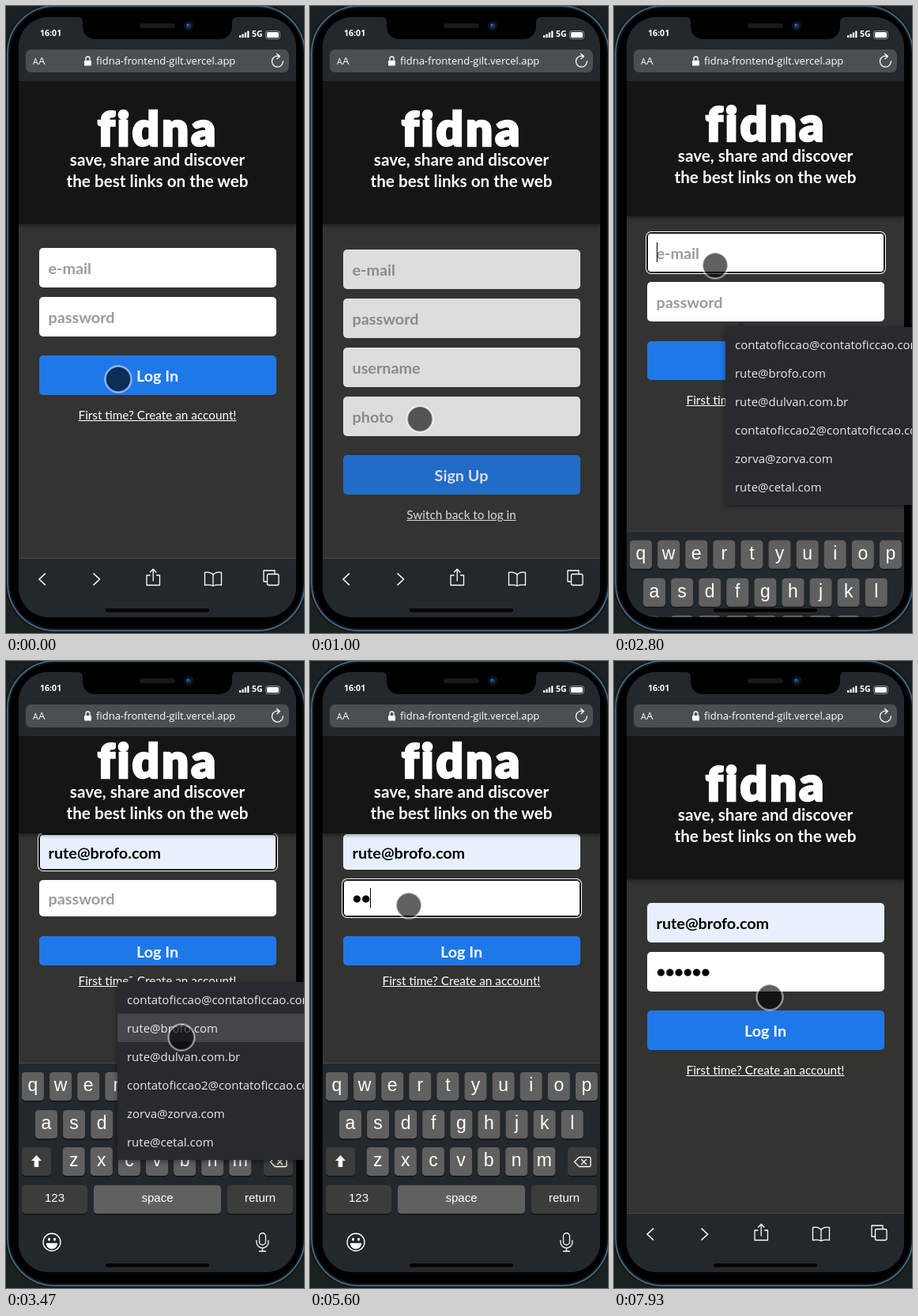
An HTML page for the animation above (8 s loop, 377 by 793 pixels).

```html
<!DOCTYPE html>
<html lang="en">
<head>
<meta charset="utf-8">
<title>Login demo</title>
<style>
  html, body { margin: 0; width: 100%; height: 100%; overflow: hidden; background: #1b2021; }
  #stage { position: relative; width: 377px; height: 793px; overflow: hidden; font-family: Lato, sans-serif; }
  #stage div, #stage svg { position: absolute; box-sizing: border-box; }
  svg { left: 0; top: 0; width: 377px; height: 793px; overflow: visible; }
  .layer { inset: 0; }

  #phone { left: 1px; top: -1px; width: 378px; height: 792px; border-radius: 61px; background: #000;
    border: 2px solid #41647b; box-shadow: 0 0 0 2px #10171b, inset 0 0 0 2px #0c1216; }
  #screen { inset: 0; background: #333331; clip-path: inset(14px 10px 20px 16px round 38px); }

  /* page */
  #head { left: 16px; top: 95px; width: 351px; height: 181px; background: #151513;
    box-shadow: 0 3px 4px rgba(0,0,0,.3); animation: head 8s linear infinite; }
  #brand { animation: brand 8s linear infinite; }
  #brand text { fill: #fff; text-anchor: middle; font: 700 20.7px Lato, sans-serif; }
  #brand .name { font: 900 60px Lato, sans-serif; letter-spacing: 3px; stroke: #fff; stroke-width: 2.5px; }
  .field, .btn { left: 41.5px; width: 300px; height: 50px; border-radius: 5px; display: flex; align-items: center;
    font-weight: 700; font-size: 19.8px; white-space: nowrap; }
  .field { background: #fff; color: #000; padding-left: 12px; }
  .field > div { left: 12px; }
  .hint { color: #9c9c9a; }
  .btn { background: #1f78e8; color: #fff; justify-content: center; }
  .link { left: 42px; width: 299px; height: 20px; line-height: 20px; text-align: center; color: #fff;
    font-size: 15.3px; text-decoration: underline; }
  #login { animation: login 8s linear infinite; }
  #signup { animation: signup 8s linear infinite; }
  #email { animation: email 8s linear infinite, emailRing 8s step-end infinite, filled 8s step-end infinite; }
  #pass { animation: pass 8s linear infinite, passRing 8s step-end infinite; }
  #go { animation: go 8s linear infinite; }
  #join { animation: join 8s linear infinite; }
  #login .caret { position: static; width: 1px; height: 25px; background: #000; }
  #email .caret { animation: emailCaret 8s step-end infinite; }
  #pass .caret { animation: passCaret 8s step-end infinite; }
  #pass #dots { position: static; height: 14px; animation: type 8s step-end infinite;
    background: radial-gradient(circle at 5.4px 8px, #000 4.2px, transparent 4.9px) 0 0 / 11.3px 14px repeat-x; }
  #emailHint { animation: emailHint 8s step-end infinite; }
  #passHint { animation: passHint 8s step-end infinite; }
  .preview { animation: preview 8s step-end infinite; }
  .value { animation: value 8s step-end infinite; }

  /* browser and keyboard */
  #top { left: 16px; top: 14px; width: 351px; height: 81px; background: #23282d; }
  #bar { left: 16px; top: 698px; width: 351px; height: 80px; background: #23282d; border-top: 1px solid #454a4b; }
  #url { left: 25px; top: 55px; width: 333px; height: 29px; border-radius: 7px; background: #4a4f51; }
  .line { fill: none; stroke: #fff; stroke-width: 1.3; stroke-linecap: round; stroke-linejoin: round; }
  .ui { fill: #fff; font-family: "Open Sans", sans-serif; }
  #keys { animation: keys 8s linear infinite; }
  #keys text { fill: #fff; text-anchor: middle; font-family: "Liberation Sans", Arial, sans-serif; }

  /* suggestions and pointer */
  #list { left: 141px; top: 406px; width: 300px; height: 225px; background: #292a2d; border-radius: 3px;
    box-shadow: 0 2px 6px rgba(0,0,0,.45); animation: list 8s step-end infinite; }
  #list::before { content: ""; position: absolute; left: 12px; top: -7px;
    border: 8px solid transparent; border-top: 0; border-bottom: 7px solid #292a2d; }
  #list .item { left: 12px; height: 36px; line-height: 36px; color: #e9eaed; white-space: nowrap;
    font-size: 15px; font-family: "Open Sans", sans-serif; }
  #hover { left: 0; top: 40px; width: 300px; height: 36px; background: #44464a; animation: hover 8s step-end infinite; }
  #dot { left: -17.5px; top: -17.5px; width: 35px; height: 35px; border-radius: 50%;
    background: rgba(0,0,0,.62); background-clip: padding-box; border: 2px solid rgba(255,255,255,.6);
    animation: move 8s linear infinite; }

  @keyframes login { 0%, 7.37% { opacity: 1 } 7.38%, 28.25% { opacity: 0 } 33.7%, 100% { opacity: 1 } }
  @keyframes signup { 0%, 7.38% { opacity: 0 } 13.5%, 28.25% { opacity: 1 } 28.26%, 100% { opacity: 0 } }

  @keyframes head { 0%, 34.12%, 93.3%, 100% { height: 181px } 35% { height: 171px } 36.6%, 90.9% { height: 123px } }
  @keyframes brand { 0%, 34.12%, 93.3%, 100% { transform: none } 35% { transform: translateY(-5px) }
    36.6%, 90.9% { transform: translateY(-29px) } }
  @keyframes email { 0%, 34.12%, 93.3%, 100% { top: 305.5px; height: 50px } 35% { top: 287.5px; height: 50px }
    36.6%, 90.9% { top: 219px; height: 45px } }
  @keyframes pass { 0%, 34.12%, 93.3%, 100% { top: 367.5px; height: 50px } 35% { top: 349.5px; height: 50px }
    36.6%, 90.9% { top: 277px; height: 45.5px } }
  @keyframes go { 0%, 34.12%, 93.3%, 100% { top: 442.3px; height: 50px } 35% { top: 424.2px; height: 50px }
    36.6%, 90.9% { top: 348px; height: 37px } }
  @keyframes join { 0%, 34.12%, 93.3%, 100% { top: 507px } 35% { top: 489px } 36.6%, 90.9% { top: 393.5px } }
  @keyframes keys { 0%, 34.1%, 93.31%, 100% { transform: translateY(300px) } 34.12%, 93.3% { transform: translateY(190px) }
    35% { transform: translateY(157px) } 36.6%, 90.9% { transform: none } }

  @keyframes emailRing { 0%, 54.9% { box-shadow: none }
    34.1% { box-shadow: inset 0 0 0 1px #101010, 0 0 0 1px #101010, 0 0 0 2px #fff } }
  @keyframes passRing { 0%, 90.8% { box-shadow: none }
    54.9% { box-shadow: inset 0 0 0 1px #101010, 0 0 0 1px #101010, 0 0 0 2px #fff } }
  @keyframes filled { 0% { background: #fff } 39.9%, 100% { background: #e7f0fc } }
  @keyframes emailCaret { 0%, 39.9%, 100% { opacity: 0 } 34.1% { opacity: 1 } }
  @keyframes passCaret { 0%, 62.4%, 86.6%, 100% { opacity: 0 } 54.9%, 68.3% { opacity: 1 } }
  @keyframes emailHint { 0% { opacity: 1 } 39.9%, 100% { opacity: 0 } }
  @keyframes passHint { 0% { opacity: 1 } 68.3%, 100% { opacity: 0 } }
  @keyframes preview { 0%, 41.6%, 100% { opacity: 0 } 39.9% { opacity: 1 } }
  @keyframes value { 0% { opacity: 0 } 41.6%, 100% { opacity: 1 } }
  @keyframes type { 0% { width: 0 } 68.3% { width: 11.3px } 70% { width: 22.6px } 71.6% { width: 33.9px }
    74.1% { width: 45.2px } 76.6% { width: 56.5px } 80.8%, 100% { width: 67.8px } }

  @keyframes list { 0%, 45.8%, 100% { visibility: hidden } 34.2% { visibility: visible } }
  @keyframes hover { 0%, 100% { opacity: 0; top: 76px } 39.9% { opacity: 1; top: 76px } 41.6%, 45.8% { opacity: 1; top: 40px } }
  @keyframes move {
    0%, .8% { transform: translate(141.5px, 471.5px) }
    .86%, 2.6% { transform: translate(141.5px, 493.5px) }
    5%, 7.4% { transform: translate(132.5px, 527.5px) }
    12.5% { transform: translate(138.5px, 521.5px) }
    17.4%, 28.4% { transform: translate(183.5px, 644.5px) }
    33.4%, 38.3% { transform: translate(127.5px, 327.5px) }
    41.6%, 43.2% { transform: translate(233.5px, 490.5px) }
    43.3%, 45.1% { transform: translate(221.5px, 475.5px) }
    54.4%, 84.1% { transform: translate(124.5px, 308.5px) }
    85% { transform: translate(129.5px, 317.5px) }
    86.6%, 88.3% { transform: translate(147.5px, 351.5px) }
    89.1%, 97.6% { transform: translate(157.5px, 369.5px) }
    99.1%, 100% { transform: translate(196.5px, 424.5px) }
  }
</style>
</head>
<body>
<div id="stage">
  <div id="phone"></div>
  <div id="screen">
    <div id="login" class="layer">
      <div id="email" class="field">
        <div id="emailHint" class="hint">e-mail</div>
        <div class="preview">rute@dulvan.com.br</div>
        <div class="value">rute@brofo.com</div>
        <div class="caret"></div>
      </div>
      <div id="pass" class="field">
        <div id="passHint" class="hint">password</div>
        <div id="dots"></div>
        <div class="caret"></div>
      </div>
      <div id="go" class="btn">Log In</div>
      <div id="join" class="link">First time? Create an account!</div>
    </div>
    <div id="signup" class="layer">
      <div class="field hint" style="top:307.5px">e-mail</div>
      <div class="field hint" style="top:369.5px">password</div>
      <div class="field hint" style="top:431.5px">username</div>
      <div class="field hint" style="top:493.5px">photo</div>
      <div class="btn" style="top:568.3px">Sign Up</div>
      <div class="link" style="top:633px">Switch back to log in</div>
    </div>

    <div id="head"></div>
    <svg id="brand">
      <text class="name" x="192" y="176.5">fidna</text>
      <text x="191.5" y="202">save, share and discover</text>
      <text x="191.5" y="229">the best links on the web</text>
    </svg>

    <div id="top"></div>
    <div id="url"></div>
    <div id="bar"></div>
    <svg>
      <path d="M91 14q6 0 6 6v4q0 18 18 18h153q18 0 18-18v-4q0-6 6-6z"/>
      <rect x="169" y="22" width="45" height="6" rx="3" fill="#17191b"/>
      <circle cx="231" cy="25" r="6.5" fill="#0d1218"/>
      <circle cx="231" cy="25" r="3.2" fill="#16345f"/>
      <circle cx="230" cy="24" r="1.2" fill="#4675b0"/>
      <g class="ui">
        <text x="43" y="38" font-size="10.6" font-weight="700">16:01</text>
        <text x="311" y="39" font-size="10.6" font-weight="700">5G</text>
        <path d="M295 37h2.3v3h-2.3zM298.4 35.5h2.3v4.5h-2.3zM301.8 33.5h2.3v6.5h-2.3zM305.2 31.5h2.3v8.5h-2.3z"/>
        <rect x="330" y="33" width="15" height="7" rx="1.5"/>
        <rect x="328.5" y="31.5" width="18" height="10" rx="2.8" fill="none" stroke="#aaa" stroke-width=".8"/>
        <text x="34" y="74" font-size="10.5">A</text>
        <text x="41" y="74" font-size="13.5">A</text>
        <text x="114" y="74" font-size="13">fidna-frontend-gilt.vercel.app</text>
        <rect x="99" y="69" width="9" height="6.5" rx="1"/>
      </g>
      <g class="line">
        <path d="M101 69v-2.5a2.5 2.5 0 0 1 5 0V69"/>
        <path d="M346 63.7a7 7 0 1 0 4.4 6.3M342.5 60.5l4 3-3.5 3.3"/>
        <path d="M49.5 718l-7.500 7 7.500 7M111 718l7.500 7-7.500 7" stroke-width="1.7"/>
        <path d="M182 720h-4v12.500h16.500v-12.500h-4M186.200 727v-14.500M182.500 716l3.700-3.700 3.700 3.700"/>
        <path d="M262 719q-4-4-10.500-2.500v16q6.500-1 10.500 1 4-2 10.500-1v-16q-6.500-1.500-10.500 2.500zv14"/>
        <path d="M330 728h-4v-14h14v4"/><rect x="330.500" y="718.500" width="14.500" height="14" rx="2"/>
      </g>
    </svg>
    <svg id="keys"></svg>
    <svg><rect x="126" y="762" width="131" height="4.500" rx="2.250"/></svg>
  </div>
  <div id="list"><div id="hover"></div></div>
  <div id="dot"></div>
</div>
<script>
  const key = (x, y, w, label, size, fill = '#5f605f') =>
    `<rect x="${x}" y="${y + 1.5}" width="${w}" height="36" rx="4.5" fill="#111416"/>
     <rect x="${x}" y="${y}" width="${w}" height="36" rx="4.5" fill="${fill}"/>
     <text x="${x + w / 2}" y="${y + (size > 20 ? 24 : 21)}" font-size="${size}">${label}</text>`;
  const row = (letters, x, y) =>
    [...letters].map((c, i) => key(x + i * 35.1, y, 28, c, 23)).join('');
  const dark = '#3c3c3a';

  document.getElementById('keys').innerHTML =
    '<rect x="16" y="508" width="351" height="285" fill="#23282d"/>' +
    '<path d="M16 508.5h351" stroke="#454a4b"/>' +
    row('qwertyuiop', 20, 520) + row('asdfghjkl', 37, 568) + row('zxcvbnm', 71.7, 615) +
    key(20, 615, 37, '', 15, dark) + key(326, 615, 37, '', 15, dark) +
    key(20, 663, 83, '123', 15, dark) + key(111, 663, 161, 'space', 15) + key(280, 663, 83, 'return', 15, dark) +
    `<path d="M38.500 625l6.500 7h-3.700v8h-5.600v-8H32z" fill="#fff"/>
     <g class="line">
       <path d="M340.500 627.500h13q1.500 0 1.500 1.500v9q0 1.500-1.500 1.500h-13l-6-6zM343.500 630.500l6 6M349.500 630.500l-6 6"/>
       <circle cx="58" cy="735" r="11"/>
       <path d="M51.500 737h13q-1 6-6.500 6t-6.500-6z" fill="#fff"/>
       <rect x="320.500" y="723.500" width="8" height="15" rx="4"/>
       <path d="M317 733v2a7.500 7.500 0 0 0 15 0v-2M324.500 742.500v4M320.500 746.500h8"/>
     </g>
     <ellipse cx="54.500" cy="731.500" rx="1.500" ry="2" fill="#fff"/><ellipse cx="61.500" cy="731.500" rx="1.500" ry="2" fill="#fff"/>`;

  const mails = ['contatoficcao@contatoficcao.com', 'rute@brofo.com', 'rute@dulvan.com.br',
    'contatoficcao2@contatoficcao.com', 'zorva@zorva.com', 'rute@cetal.com'];
  document.getElementById('list').insertAdjacentHTML('beforeend',
    mails.map((m, i) => `<div class="item" style="top:${4 + i * 36}px">${m}</div>`).join(''));
</script>
</body>
</html>
```
